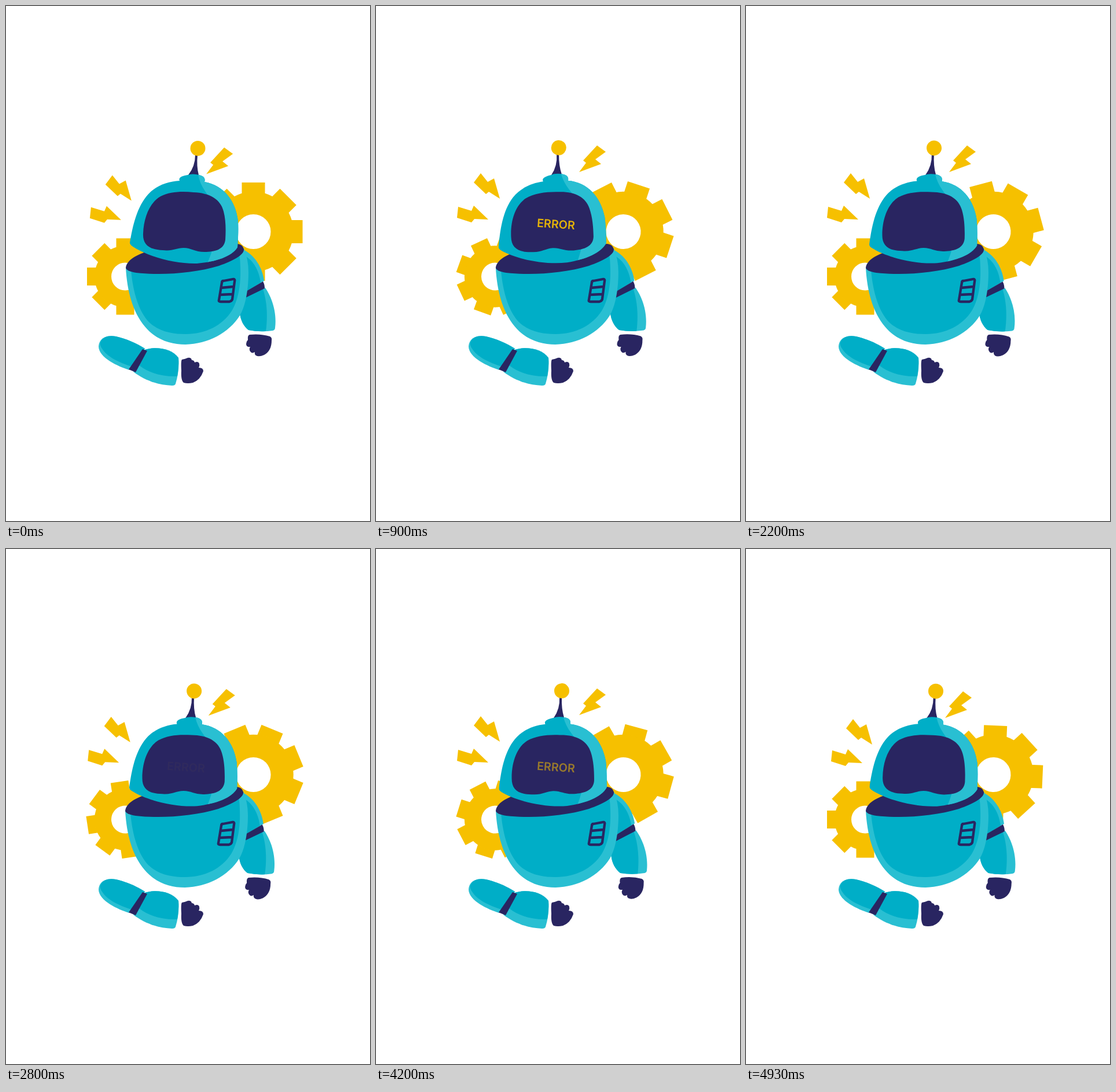
These frames come from a looping animation (629x890 px, 5010 ms). An HTML page:

```html
<!DOCTYPE html>
<html lang="en">
<head>
<meta charset="utf-8">
<title>Broken robot</title>
<style>
  html, body { margin: 0; width: 100%; height: 100%; overflow: hidden; background: #fff; }
  svg { display: block; width: 629px; height: 890px; }
  .teal { fill: #00aec7; }
  .light { fill: #29bfd2; }
  .navy { fill: #292561; }
  .gold { fill: #f6c000; }
  text { font: 600 19.8px Inter, Arial, sans-serif; text-anchor: middle; }
</style>
</head>
<body>
<svg viewBox="0 0 629 890">
  <g id="bigGear" class="gold"></g>
  <g id="smallGear" class="gold"></g>

  <g id="bolts" class="gold">
    <path d="M181 289L193 304 204 298 214 333 195 321 190 325 169 305Z"/>
    <path d="M142 347L165 354 169 345 194 369 170 368 165 374 140 366Z"/>
    <path d="M382 241L397 252 379 265 389 273 351 287 363 271 358 267Z"/>
  </g>

  <g id="torso">
    <g id="arm">
      <path class="light" d="M408 420C430 430 443 452 446 475L416 493 400 480Z"/>
      <path class="teal" d="M408 430C426 436 437 456 440 478L416 493 400 480Z"/>
      <path class="light" d="M412 503L448 487C461 506 468 532 465 556Q465 560 461 561 440 564 419 560C411 554 405 543 404 530Z"/>
      <path class="teal" d="M412 503L444 489C452 514 452 540 449 562Q434 563 419 560C411 554 405 543 404 530Z"/>
      <path class="navy" d="M410 496L444 476Q447 481 447 488L410 506Z"/>
      <path class="navy" d="M421 568Q440 566 456 571 460 573 459 578 459 596 446 603 437 607 432 604 429 602 430 598 424 602 421 595 420 592 422 589 415 590 415 584 415 580 418 577 417 569 421 568Z"/>
    </g>
    <path class="light" d="M207 452C209 490 218 528 240 554C259 577 285 585 310 585C349 584 385 565 404 535C414 518 419 490 419 460Q419 438 411 419Z"/>
    <path class="teal" d="M216 456C219 490 227 522 244 543C262 563 288 567 310 567C345 567 374 552 390 527C402 507 406 480 405 452Q405 440 403 428Z"/>
    <path class="navy" d="M207 452C209 439 224 431 244 424L400 411Q409 412 411 420C412 430 393 440 368 449C325 462 268 466 225 461Q207 458 207 452Z"/>
    <path d="M376 475L393 472Q396 472 395 476L391 507Q390 510 386 511L371 511Q367 511 368 508L373 478Q373 475 376 475ZM372 487L393 485M370 499L391 498" fill="none" stroke="#292561" stroke-width="4.3"/>
  </g>

  <g id="head">
    <path class="navy" d="M327 257Q327 277 315 292L333 292Q329 277 331 257Z"/>
    <circle class="gold" cx="331.5" cy="246" r="13"/>
    <clipPath id="shell">
      <path d="M214 409C219 380 226 347 246 325C260 310 280 303 300 302C297 296 306 293 314 292Q322 289 334 292C342 294 345 298 343 304C377 310 397 337 401 372Q402 390 400 417C390 433 363 442 330 445C290 446 243 432 218 415Q214 412 214 409Z"/>
    </clipPath>
    <g clip-path="url(#shell)">
      <path class="teal" d="M200 280H410V460H200Z"/>
      <path class="light" d="M331 285Q333 304 344 320C368 352 368 405 346 448H420V285Z"/>
    </g>
    <path class="navy" d="M237 393C238 366 248 340 267 329C283 321 303 320 324 322C352 323 371 334 376 355C380 370 380 388 379 404C377 421 361 425 343 425C326 425 320 418 307 418C294 418 288 424 271 422C246 421 236 411 237 393Z"/>
  </g>

  <g>
    <path class="light" d="M160 588C161 573 175 568 190 571C208 575 226 583 240 592L213 629C194 623 160 608 160 588Z"/>
    <path class="teal" d="M163 582C167 571 178 569 190 571C208 575 226 583 240 592L217 623C195 616 174 606 166 592Q162 587 163 582Z"/>
    <path class="light" d="M240 594C258 588 286 591 298 608Q300 630 293 653 292 656 287 656C264 655 241 648 220 632Z"/>
    <path class="teal" d="M240 594C258 588 286 591 298 608Q299 624 296 640C272 641 248 635 230 621Z"/>
    <path class="navy" d="M236 593L244 596 224 633 212 628Z"/>
    <path class="navy" d="M304 611Q310 610 314 608 320 607 321 612 325 612 326 616 332 613 334 618 335 622 333 625 341 625 341 631 336 646 323 651 314 653 307 651 302 647 303 630 302 613 304 611Z"/>
  </g>

  <text id="label" class="gold" x="311" y="384" transform="rotate(3.8 311 377)">ERROR</text>
</svg>
<script>
  const $ = id => document.getElementById(id);
  const LOOP = 5010, CYCLE = 2500;

  // Key times within one cycle, shared by every track.
  const KEYS = [0, 400, 950, 1400, 1700, 2200, 2450, CYCLE];
  const tracks = {
    big:   [0, 30, 66.5, 75, 60.3, 30, 2.5],
    small: [0, -11.5, -26.5, -45, -27.5, 0, 0],
    head:  [0, -2.5, -4.85, -0.75, -3.1, -1.9, -1.03],
    arm:   [0, 0.45, -0.7, -1.45, -1.4, 0.6, 0.1],
    sway:  [0, -1.3, 0, -1.3, 0, 0, 0],
    bolts: [0.7, 0, 0, 0, 0, 0, 1],
    label: [0, 0.04, 1, 1, 0.55, 0, 0]
  };
  const boltShift = [[4, 5], [7, 1], [-7, 5]];

  function buildGear(id, outer, root, hole, half) {
    const tooth = a => `<rect x="${-half}" y="${-outer}" width="${2 * half}" height="${outer - root + 8}" transform="rotate(${a * 45})"/>`;
    const ring = (root + hole) / 2;
    $(id).innerHTML = [...Array(8).keys()].map(tooth).join("") +
      `<circle r="${ring}" fill="none" stroke="#f6c000" stroke-width="${root - hole}"/>`;
  }

  function sample(values, t) {
    const i = KEYS.findIndex(k => k > t) - 1;
    const a = values[i], b = values[(i + 1) % values.length];
    return a + (b - a) * (t - KEYS[i]) / (KEYS[i + 1] - KEYS[i]);
  }

  // Twenty poses a second, held for 30 and 70 ms in turn.
  function poseTime(ms) {
    const step = 2 * Math.floor(ms / 100) + (ms % 100 >= 30 ? 1 : 0);
    return Math.min(step, 99) * 50 % CYCLE;
  }

  const move = (el, value) => el.setAttribute("transform", value);

  function draw(now) {
    const t = poseTime(now % LOOP);
    const at = name => sample(tracks[name], t);
    move($("bigGear"), `translate(427.5 390) rotate(${at("big")})`);
    move($("smallGear"), `translate(206 467.5) rotate(${at("small")})`);
    move($("head"), `rotate(${at("head")} 310 440)`);
    move($("arm"), `rotate(${at("arm")} 418 430)`);
    move($("torso"), `translate(${at("sway")} 0)`);
    const k = at("bolts");
    [...$("bolts").children].forEach((el, i) =>
      move(el, `translate(${boltShift[i].map(d => d * k)})`));
    $("label").style.opacity = at("label");
  }

  buildGear("bigGear", 85, 69, 30, 20);
  buildGear("smallGear", 66, 53, 24, 15.5);

  const start = performance.now();
  (function tick() {
    draw(performance.now() - start);
    requestAnimationFrame(tick);
  })();
</script>
</body>
</html>
```
